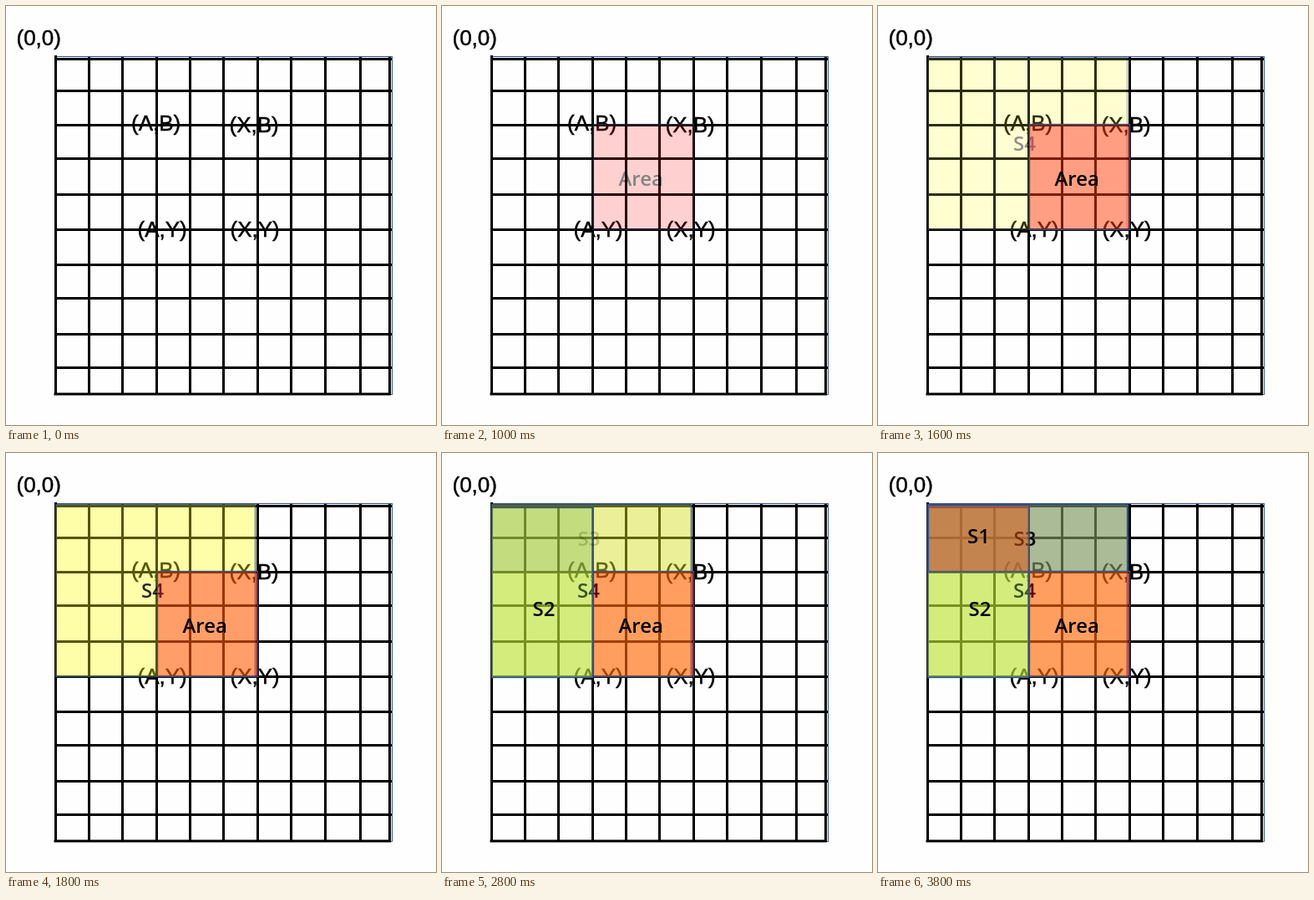
An HTML page for the animation above (4.2 s loop, 515 px wide and 501 px high).

```html
<!DOCTYPE html>
<html lang="en">
<head>
<meta charset="utf-8">
<title>Grid areas</title>
<style>
  html, body { margin: 0; width: 100%; height: 100%; overflow: hidden; background: #fefefe; }
  svg { display: block; width: 515px; height: 501px; }
  .label { font: 26px "Liberation Sans", Arial, sans-serif; stroke: #000; stroke-width: .45; }
  .name { font: 600 24px "Open Sans", "Noto Sans", sans-serif; }
</style>
</head>
<body>
<svg id="stage" viewBox="0 0 515 501"></svg>
<script>
const LOOP = 4200, STEP = 100;
const OUTLINE = "#2f528f";
const stage = document.getElementById("stage");

function add(parent, tag, attrs, text) {
  const node = document.createElementNS("http://www.w3.org/2000/svg", tag);
  for (const key in attrs) node.setAttribute(key, attrs[key]);
  if (text) node.textContent = text;
  parent.appendChild(node);
  return node;
}

function box(parent, [left, top, right, bottom], attrs) {
  add(parent, "rect", { x: left, y: top, width: right - left, height: bottom - top, ...attrs });
}

function drawGrid() {
  const columns = [59.5, 99.5, 139.5, 180.5, 220.5, 260.5, 301.5, 341.5, 382.5, 424.5, 459.5];
  const rows = [63.5, 101.5, 142.5, 182.5, 225.5, 267.5, 309.5, 349.5, 392.5, 432.5, 464];
  box(stage, [59.5, 60.5, 462.5, 464.5], { fill: "none", stroke: OUTLINE });
  const path = columns.map((x, i) => `M${x} ${i ? 61 : 59}V465`).join("")
    + rows.map((y, i) => `M${i < 10 ? 59 : 57.5} ${y}H${i < 10 ? 462 : 461}`).join("");
  add(stage, "path", { d: path, stroke: "#000", "stroke-width": 3, fill: "none" });
}

function drawLabels() {
  const labels = [
    ["(0,0)", 12.5, 47], ["(A,B)", 150, 149], ["(X,B)", 267.5, 150.5],
    ["(A,Y)", 157.5, 275.5], ["(X,Y)", 268.5, 275.5]
  ];
  for (const [text, x, y] of labels) add(stage, "text", { x, y, class: "label" }, text);
}

// Listed from back to front; "first" is the opacity of the first fade step.
const layers = [
  { name: "S4", at: [162, 173], edges: [59.5, 61.5, 298.5, 267.5], color: "#ff0", alpha: .4, start: 1400, first: .04 },
  { name: "S2", at: [108.5, 195], edges: [59.5, 65.5, 180.5, 268.5], color: "#92d050", alpha: .4, start: 2000, first: .08 },
  { name: "S3", at: [162.5, 111], edges: [59.5, 61.5, 299.5, 141.5], color: "#2f5597", alpha: .4, start: 2700, first: .03 },
  { name: "S1", at: [107, 108], edges: [60.5, 62.5, 181, 142], color: "#f85a18", alpha: .5, start: 3400, first: .2 },
  { name: "Area", at: [211.5, 215], edges: [181.5, 141.5, 301.5, 267.5], color: "#f00", alpha: .38, start: 800, first: .08 }
];

drawGrid();
drawLabels();
for (const layer of layers) {
  const [x, y] = layer.at;
  layer.group = add(stage, "g", { opacity: 0 });
  box(layer.group, layer.edges, { fill: layer.color, "fill-opacity": layer.alpha, stroke: OUTLINE, "stroke-width": 1.3 });
  add(layer.group, "text", { x, y, class: "name" }, layer.name);
}

function render(time) {
  for (const { group, start, first } of layers) {
    const step = Math.floor((time - start) / STEP);
    group.setAttribute("opacity", step < 0 ? 0 : Math.min(1, first + step * .2));
  }
}

const origin = performance.now();
function tick() {
  render((performance.now() - origin) % LOOP);
  requestAnimationFrame(tick);
}
tick();
</script>
</body>
</html>
```
